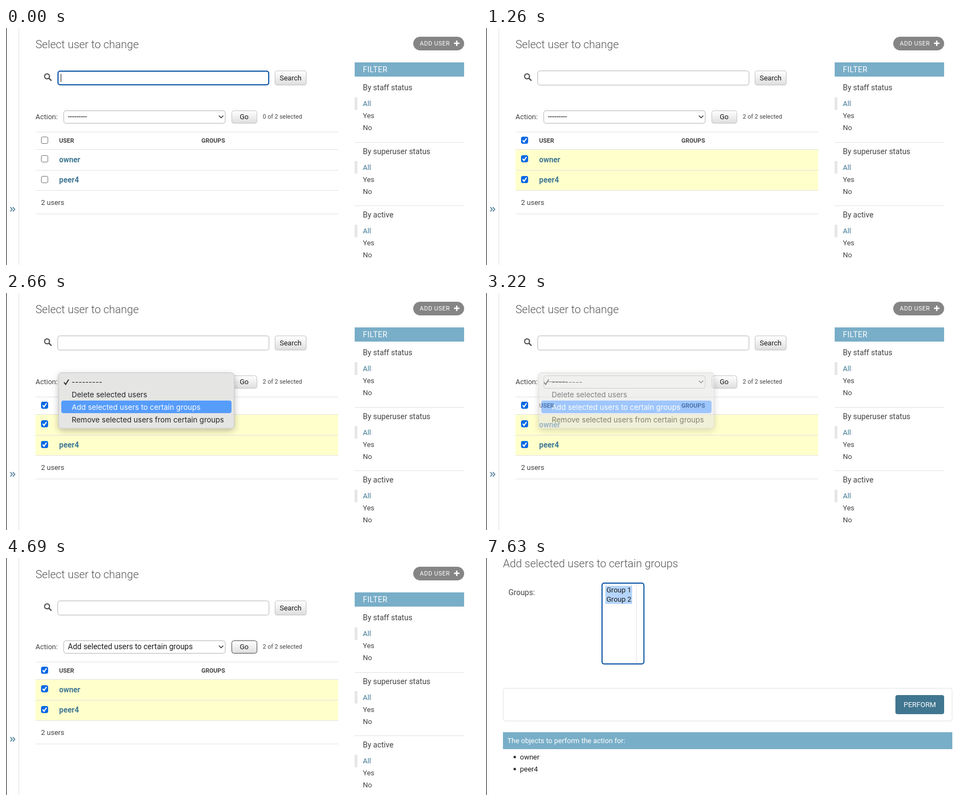
Write an HTML page that moves like this. It is 866 by 434 pixels and loops after 8000 ms.

```html
<!DOCTYPE html>
<html lang="en">
<head>
<meta charset="utf-8">
<title>User list action</title>
<style>
  html, body { margin: 0; width: 100%; height: 100%; overflow: hidden; background: #fff; }
  svg { display: block; width: 866px; height: 434px; font: 13px Roboto, sans-serif; fill: #444; }
  text { white-space: pre; }
  .title { font-size: 20px; font-weight: 300; fill: #555; }
  .big { font-size: 14px; }
  .small { font-size: 11px; }
  .bold { font-weight: 700; }
  .link { fill: #417893; }
  .dark { fill: #1c1c1c; }
  .white { fill: #fff; }
  .caps { letter-spacing: .5px; }
  .line { fill: none; stroke: #e2e2e2; }
  .field { fill: #fff; stroke: #b5b5b5; }
  .button { fill: url(#shade); stroke: #c4c4c4; }
  .focus { fill: none; stroke: #0b55a6; stroke-width: 2; }
  .box { fill: #fff; stroke: #767676; }
  .tick { fill: none; stroke: #fff; stroke-width: 2; }
  #menu { font: 13.5px Inter, sans-serif; fill: #262626; }
</style>
</head>
<body>
<svg viewBox="0 0 866 434">
  <defs>
    <linearGradient id="shade" x2="0" y2="1">
      <stop stop-color="#fff"/><stop offset="1" stop-color="#dedede"/>
    </linearGradient>
    <filter id="shadow" x="-10%" y="-20%" width="120%" height="150%">
      <feDropShadow dx="0" dy="4" stdDeviation="6" flood-opacity=".25"/>
    </filter>
  </defs>

  <g id="list">
    <path class="line" d="M23.5 0V434"/>
    <path d="M8 328l3.5 4-3.5 4M12.5 328l3.5 4-3.5 4" fill="none" stroke="#417690" stroke-width="1.6"/>
    <text class="title" x="54" y="37">Select user to change</text>
    <rect x="744" y="16" width="93" height="25" rx="12.5" fill="#858585"/>
    <text class="small caps white" x="756" y="32">ADD USER</text>
    <path d="M818.5 28h10M823.5 23v10" stroke="#fff" stroke-width="2.4"/>

    <g fill="none" stroke="#4c4c4c" stroke-width="2">
      <circle cx="75" cy="88.5" r="4.5"/><path d="M78.5 92l4.5 4.5" stroke-width="2.4"/>
    </g>
    <rect class="field" x="94.5" y="78.5" width="386" height="26" rx="4"/>
    <rect class="focus" id="searchFocus" x="95" y="79" width="385" height="25" rx="4"/>
    <path id="caret" d="M100.5 84V99" stroke="#222"/>
    <rect class="button" x="491.5" y="78.5" width="57" height="26" rx="3.5"/>
    <text class="dark" x="500" y="96">Search</text>

    <text x="54" y="167">Action:</text>
    <rect class="field" x="105.5" y="151.5" width="295" height="23" rx="4"/>
    <text class="big dark" id="choice" x="113" y="167"></text>
    <path d="M389 160.5l4 4 4-4" fill="none" stroke="#333" stroke-width="1.5"/>
    <rect class="button" id="go" x="412.5" y="151.5" width="46" height="23" rx="4"/>
    <text class="dark" x="427" y="167">Go</text>
    <text class="small" id="count" x="469" y="166"></text>

    <rect id="marked" x="54" y="223" width="553" height="74" fill="#ffc"/>
    <path class="line" d="M54 190.5H607M54 222.5H607M54 260.5H607M54 297.5H607M54 340.5H607"/>
    <g class="small bold"><text x="97" y="210">USER</text><text x="357" y="210">GROUPS</text></g>
    <g class="big bold link"><text x="97" y="245.5">owner</text><text x="97" y="283">peer4</text></g>
    <g id="boxes"></g>
    <text x="64" y="324">2 users</text>

    <rect x="637" y="63" width="200" height="26" fill="#79aec8"/>
    <text class="big caps white" x="652" y="81">FILTER</text>
    <g id="filters"></g>
    <path class="line" d="M637 209.5H837M637 325.5H837"/>

    <g id="menu">
      <rect x="96" y="146" width="321" height="102" rx="6" fill="#e5e5e4" stroke="#c2c2c2" filter="url(#shadow)"/>
      <rect id="hover" x="101" width="311" height="23" rx="4" fill="#569cfb"/>
      <path id="check" d="M106 163.5l3 4 5.5-9" fill="none" stroke-width="1.8"/>
      <g id="items"></g>
    </g>
  </g>

  <g id="form">
    <text class="title" x="31" y="17">Add selected users to certain groups</text>
    <text class="big" x="41" y="67.5">Groups:</text>
    <rect class="field" x="211.5" y="45.5" width="77" height="149" rx="4"/>
    <path class="line" d="M274.5 46V194"/>
    <path id="edge" d="M287.5 47V193" stroke="#d0d0d0"/>
    <rect id="picked" x="218" y="51" width="49" fill="#b4d5fb"/>
    <rect class="focus" id="groupFocus" x="212" y="46" width="76.5" height="148" rx="4"/>
    <g class="dark"><text x="220" y="63">Group 1</text><text x="220" y="79.5">Group 2</text></g>
    <rect class="line" x="31.5" y="238.5" width="820" height="60" rx="4"/>
    <rect x="748" y="251" width="89" height="35" rx="4" fill="#417690"/>
    <text class="white" x="763" y="273">PERFORM</text>
    <rect x="31" y="319" width="821" height="31" fill="#79aec8"/>
    <text class="white" x="39" y="339">The objects to perform the action for:</text>
    <path d="M50.5 362.5h4v4h-4zM50.5 384.5h4v4h-4z" fill="#222"/>
    <g class="dark"><text x="62" y="368.5">owner</text><text x="62" y="390.5">peer4</text></g>
  </g>

  <path d="M.5 0V434" stroke="#111"/>
</svg>

<script>
const LOOP = 8000, STEP = 70;
const $ = id => document.getElementById(id);
const show = (id, on) => $(id).setAttribute('visibility', on ? 'inherit' : 'hidden');
const DASHES = '---------';
const actions = [DASHES, 'Delete selected users', 'Add selected users to certain groups',
  'Remove selected users from certain groups'];

$('filters').innerHTML = ['staff status', 'superuser status', 'active'].map((name, i) => `
  <g transform="translate(0 ${i * 116.6})">
    <text class="big" x="652" y="114">By ${name}</text>
    <rect x="637" y="127" width="5" height="23" fill="#e6e6e6"/>
    <text class="link" x="652" y="143">All</text>
    <text x="652" y="165">Yes</text>
    <text x="652" y="187">No</text>
  </g>`).join('');

$('boxes').innerHTML = [199, 233, 271].map(y => `
  <g transform="translate(64 ${y})">
    <rect class="box" x=".5" y=".5" width="12" height="12" rx="2.5"/>
    <path class="tick" d="M3 6.5l2.5 3 4.5-6.5"/>
  </g>`).join('');

$('items').innerHTML = actions.map((name, i) =>
  `<text x="120" y="${168 + i * 23}">${name}</text>`).join('');

const boxes = document.querySelectorAll('.box');
const ticks = document.querySelectorAll('.tick');
const items = document.querySelectorAll('#items text');

function drawList(t) {
  const checked = t >= 910;
  show('caret', t < 140);
  show('searchFocus', t < 700);
  show('marked', checked);
  $('count').textContent = `${checked ? 2 : 0} of 2 selected`;
  boxes.forEach((box, i) => {
    const pressed = i === 0 && t >= 700;
    box.style.fill = checked ? '#0969e3' : pressed ? '#e6e6e6' : '';
    box.style.stroke = checked ? '#0969e3' : pressed ? '#555' : '';
  });
  ticks.forEach(tick => tick.style.visibility = checked ? 'inherit' : 'hidden');

  // The chosen item blinks once, then the menu fades away.
  const row = t < 1960 ? 0 : t < 2030 ? 1 : 2;
  const lit = t < 3010 || t >= 3080;
  const fade = Math.max(0, Math.min(1, 1 - (t - 3120) / 230));
  show('menu', t >= 1680 && fade > 0);
  $('menu').setAttribute('opacity', fade);
  show('hover', lit);
  $('hover').setAttribute('y', 151 + row * 23);
  items.forEach((item, i) => item.style.fill = lit && i === row ? '#fff' : '');
  $('check').setAttribute('stroke', lit && row === 0 ? '#fff' : '#262626');

  $('choice').textContent = actions[fade > 0 ? 0 : 2];
  $('go').style.stroke = t >= 4620 ? '#4a4a4a' : '';
}

function drawForm(t) {
  const picks = t < 6720 ? 0 : t < 6860 ? 1 : 2;
  show('groupFocus', picks);
  show('edge', !picks);
  $('picked').setAttribute('height', picks * 16.5);
}

function frame(now) {
  const t = Math.floor(now % LOOP / STEP) * STEP;
  const onList = t < 4830;
  show('list', onList);
  show('form', !onList);
  if (onList) drawList(t); else drawForm(t);
  requestAnimationFrame(frame);
}
frame(performance.now());
</script>
</body>
</html>
```
